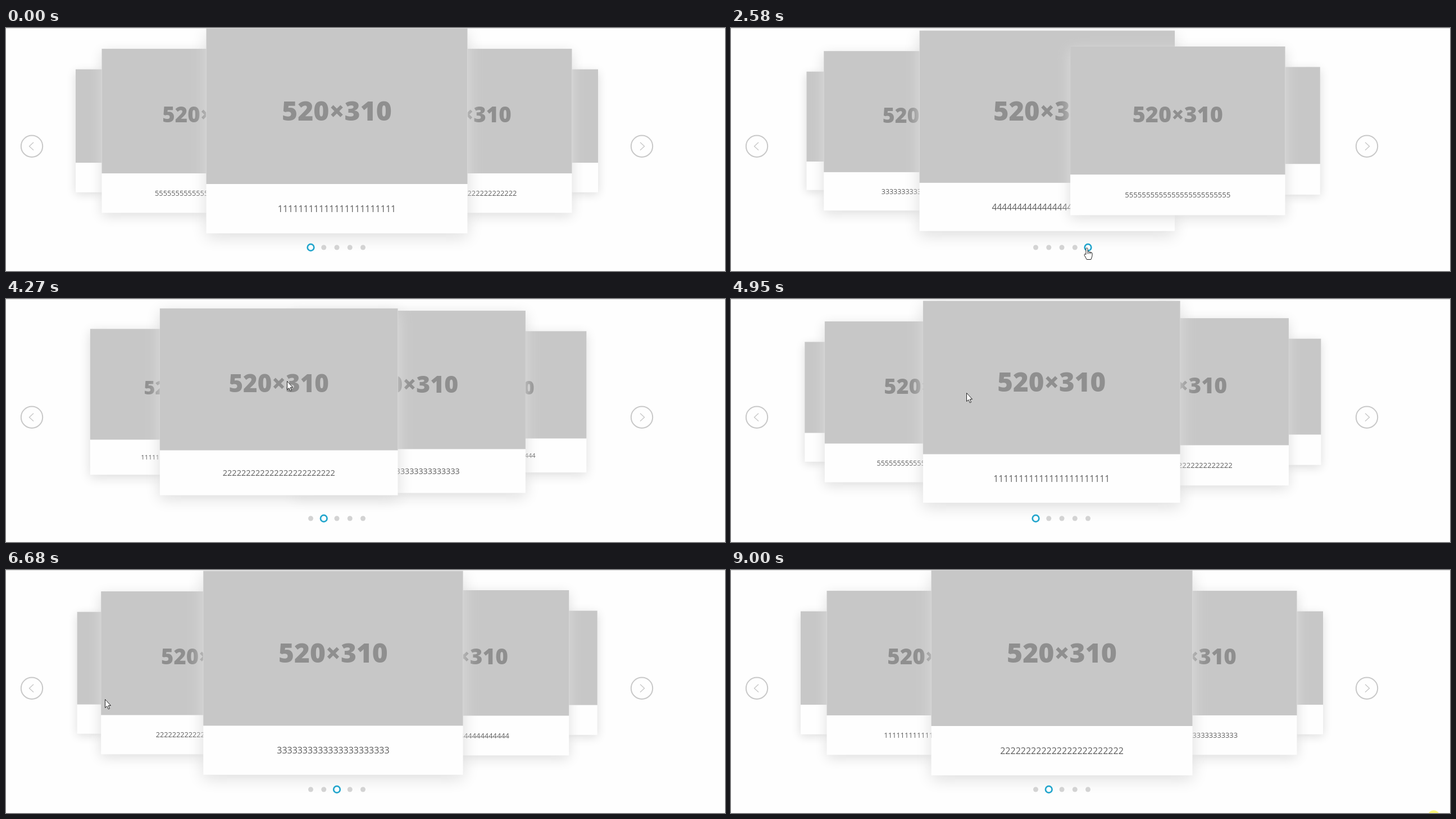
An HTML page with a canvas for the animation above (9.07 s loop, 1280 by 433 pixels).

```html
<!DOCTYPE html>
<html lang="en">
<head>
<meta charset="utf-8">
<title>Card carousel</title>
<style>
  html, body { margin: 0; width: 100%; height: 100%; overflow: hidden; background: #fefefe; }
  canvas { display: block; }
</style>
</head>
<body>
<canvas id="stage" width="1280" height="433"></canvas>
<script>
const ctx = document.getElementById('stage').getContext('2d');
const LOOP = 9070, SPEED = 300;
const CARD = { w: 465, h: 365.4, imageH: 277.5, x: 589, y: 183.2 };
const CAPTION_LENGTHS = [23, 24, 22, 22, 25];
const GRAY = '#c8c8c8', BLUE = '#22a5cc';
const PREV = { x: 46, y: 210.7, dir: -1 }, NEXT = { x: 1132, y: 210.7, dir: 1 };
const DOTS = [0, 1, 2, 3, 4].map(i => ({ x: 542.5 + 23.25 * i, y: 391 }));

// The session: slide changes, and places where the pointer rests
const moves = [], stops = [];
const slideTo = (index, start) => moves.push({ index, start });
const stay = (x, y, from, to = from) => stops.push({ x, y, from, to });

function script() {
  stay(1192, 262, 200);
  stay(NEXT.x + 6, NEXT.y + 5, 330, 1960);
  for (let i = 0; i < 3; i++) slideTo(i + 1, 720 + 600 * i);

  [4, 2].forEach((dot, i) => {
    const start = 2500 + 1019 * i;
    stay(DOTS[dot].x - 3, DOTS[dot].y + 1, start - 250, start + 540 * i + 150);
    slideTo(dot, start);
  });

  // Five even flicks to the right, each starting further left and lower
  for (let i = 0; i < 5; i++) {
    const start = 4170 + 565.25 * i, x = 482 - 81 * i, y = 152 + 21 * i;
    stay(x, y, start - 66);
    stay(x + 18, y - 6, start, start + 240);
    slideTo(1 - i, start);
  }

  stay(57, 230, 7340, 7600);
  stay(PREV.x + 2, PREV.y + 4, 7680, 8050);
  slideTo(-4, 7760);
  stay(1246, 397, 8470);
  stay(1248, 433, 8670);
}
script();

const lerp = (a, b, p) => a + (b - a) * p;
const mod5 = i => ((i % 5) + 5) % 5;

// The CSS "ease" curve, cubic-bezier(.25, .1, .25, 1)
function ease(x) {
  if (x <= 0 || x >= 1) return Math.min(1, Math.max(0, x));
  const bezier = (a, b, s) => 3 * a * s * (1 - s) ** 2 + 3 * b * s * s * (1 - s) + s ** 3;
  let lo = 0, hi = 1;
  for (let i = 0; i < 24; i++) {
    const mid = (lo + hi) / 2;
    if (bezier(0.25, 0.25, mid) < x) lo = mid; else hi = mid;
  }
  return bezier(0.1, 1, lo);
}

// Placement of a card that is d slides away from the middle
function placement(d) {
  const a = Math.abs(d);
  const spread = a > 1 ? 1 + (a - 1) * 0.3 : 1;
  return { x: CARD.x + CARD.w * d * (1 - spread / 2), scale: 1 - a / 5 };
}

function carouselAt(t) {
  let from = 0, to = 0, p = 1;
  for (const { index, start } of moves) {
    if (t < start) break;
    from = to;
    to = index;
    p = ease((t - start) / SPEED);
  }
  return { from, to, p };
}

function pointerAt(t) {
  const next = stops.findIndex(stop => t <= stop.to);
  if (next < 0 || t < stops[0].from) return null;
  const b = stops[next];
  if (t >= b.from) return b;
  const a = stops[next - 1];
  const p = (t - a.to) / (b.from - a.to);
  return { x: lerp(a.x, b.x, p), y: lerp(a.y, b.y, p) };
}

function polyline(points) {
  ctx.beginPath();
  points.forEach(([x, y]) => ctx.lineTo(x, y));
}

function disc(x, y, r) {
  ctx.beginPath();
  ctx.arc(x, y, r, 0, Math.PI * 2);
}

function drawCard(index, x, scale) {
  const { w, h, imageH, y } = CARD;
  ctx.save();
  ctx.translate(x, y);
  ctx.scale(scale, scale);
  ctx.shadowColor = '#ddd';
  ctx.shadowBlur = 27 * scale;
  ctx.shadowOffsetY = 7.2 * scale;
  ctx.fillStyle = '#fefefe';
  ctx.fillRect(-w / 2, -h / 2, w, h);
  ctx.shadowColor = 'transparent';
  ctx.fillStyle = '#c7c7c7';
  ctx.fillRect(-w / 2, -h / 2, w, imageH);
  ctx.textAlign = 'center';
  ctx.fillStyle = '#8f8f8f';
  ctx.font = '800 48px "Open Sans", sans-serif';
  ctx.fillText('520×310', 0, -18.6);
  ctx.fillStyle = '#5c5c5c';
  ctx.font = '16px "Open Sans", sans-serif';
  const card = mod5(index);
  ctx.fillText(String(card + 1).repeat(CAPTION_LENGTHS[card]), 0, 144.9);
  ctx.restore();
}

function drawCards({ from, to, p }) {
  for (let d = 3; d >= 0; d--) {
    for (const index of d ? [to - d, to + d] : [to]) {
      const a = placement(index - from), b = placement(index - to);
      drawCard(index, lerp(a.x, b.x, p), lerp(a.scale, b.scale, p));
    }
  }
}

function drawDots(active) {
  DOTS.forEach(({ x, y }, i) => {
    if (i === active) {
      disc(x, y, 5.8);
      ctx.fillStyle = '#fff';
      ctx.fill();
      ctx.strokeStyle = BLUE;
      ctx.lineWidth = 2.7;
      ctx.stroke();
    } else {
      disc(x, y, 4.5);
      ctx.fillStyle = '#d3d3d3';
      ctx.fill();
    }
  });
}

function drawButton({ x, y, dir }, hovered) {
  ctx.strokeStyle = hovered ? BLUE : GRAY;
  ctx.lineWidth = 2;
  disc(x, y, 19.2);
  ctx.stroke();
  ctx.lineWidth = 1.4;
  polyline([[x - 3 * dir, y - 7], [x + 4.5 * dir, y], [x - 3 * dir, y + 7]]);
  ctx.stroke();
}

function traceArrow() {
  polyline([[0, 0], [0, 15], [3.3, 12], [5.8, 17.4], [8, 16.4], [5.7, 11.2], [10, 11]]);
}

// A raised finger, three folded ones and a thumb
function traceHand() {
  ctx.beginPath();
  ctx.moveTo(-1.6, 11);
  ctx.lineTo(-1.6, 1);
  ctx.arc(0, 1, 1.6, Math.PI, 0);
  ctx.lineTo(1.6, 6);
  for (let i = 1; i <= 3; i++) {
    ctx.quadraticCurveTo(2.7 * i, 4 + i * 0.7, 1.6 + 2.7 * i, 6 + i);
  }
  ctx.lineTo(9.4, 14);
  ctx.lineTo(7.4, 20);
  ctx.lineTo(-0.2, 20);
  ctx.lineTo(-4.6, 12);
  ctx.quadraticCurveTo(-4, 8.5, -1.6, 11);
}

function drawPointer({ x, y }, overControl) {
  ctx.save();
  ctx.translate(Math.round(x) + 0.5, Math.round(y) + 0.5);
  if (overControl) traceHand(); else traceArrow();
  ctx.closePath();
  ctx.fillStyle = '#fff';
  ctx.strokeStyle = '#222';
  ctx.lineWidth = 1;
  ctx.fill();
  ctx.stroke();
  if (overControl) {
    for (let i = 0; i < 3; i++) {
      polyline([[1.6 + 2.7 * i, 6.5], [1.6 + 2.7 * i, 10]]);
      ctx.stroke();
    }
  }
  ctx.restore();
}

function draw(t) {
  ctx.fillStyle = '#fefefe';
  ctx.fillRect(0, 0, 1280, 433);

  const carousel = carouselAt(t);
  const pointer = pointerAt(t);
  const over = (target, r) =>
    pointer !== null && Math.hypot(pointer.x - target.x, pointer.y - target.y) < r;

  drawCards(carousel);
  drawDots(mod5(carousel.to));
  for (const button of [PREV, NEXT]) drawButton(button, over(button, 20));

  ctx.fillStyle = '#dcdcdc';
  ctx.fillRect(0, 0, 1280, 1);

  if (pointer) {
    drawPointer(pointer, over(PREV, 20) || over(NEXT, 20) || DOTS.some(d => over(d, 7)));
  }
  // Click highlight at the lower edge, just before the loop restarts
  if (t >= 8999) {
    disc(1251, 438.8, 10.6);
    ctx.fillStyle = '#fbf77c';
    ctx.fill();
  }
}

// The picture advances at 15 steps a second
function tick(now) {
  const t = now % LOOP;
  draw(Math.floor((t + 15) * 0.015) / 0.015);
  requestAnimationFrame(tick);
}
requestAnimationFrame(tick);
</script>
</body>
</html>
```
